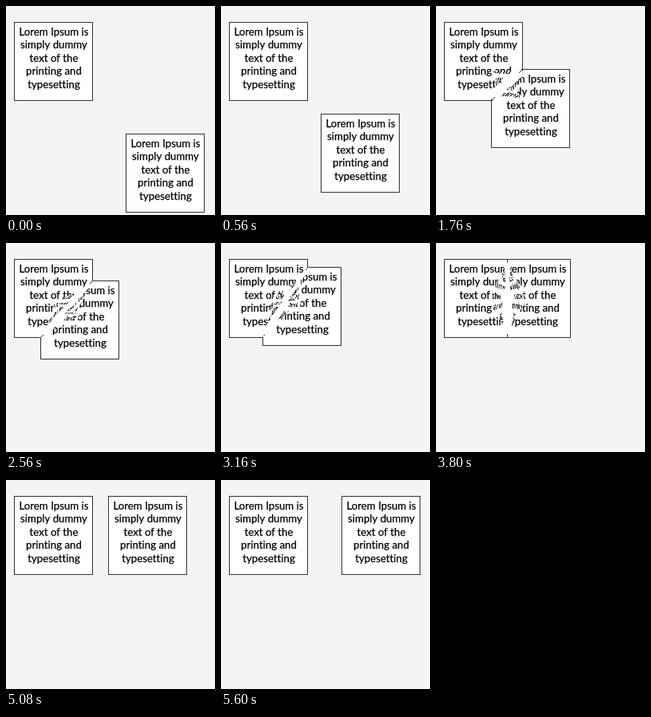
Recreate the animation shown at these times as an HTML page with a canvas. Size 262x262 px, loop 5680 ms.

```html
<!DOCTYPE html>
<html lang="en">
<head>
<meta charset="utf-8">
<title>Colliding text boxes</title>
<style>
  html, body { margin: 0; width: 100%; height: 100%; overflow: hidden; background: #f4f4f4; }
  canvas { display: block; width: 262px; height: 262px; }
</style>
</head>
<body>
<canvas id="stage" width="262" height="262"></canvas>
<script>
const STAGE = 262, SIZE = 99, HALF = SIZE / 2;
const STEP = 40, LAST_STEP = 140, LOOP = 5680;
const MARGIN = 6;
const FIXED = { x: 10, y: 20 };
const LINES = ['Lorem Ipsum is', 'simply dummy', 'text of the', 'printing and', 'typesetting'];

// Path of the moving box: [step, x, y]
const PATH = [
  [0, 150, 160], [30, 96, 106], [44, 69, 79], [60, 40.4, 50.2],
  [64, 43, 47], [75, 50, 34], [88, 57.4, 20], [140, 151, 20]
];

const ctx = document.getElementById('stage').getContext('2d');
const image = ctx.createImageData(STAGE, STAGE);
const pixels = new Uint32Array(image.data.buffer);
const card = makeCard();

function makeCard() {
  const canvas = document.createElement('canvas');
  canvas.width = canvas.height = SIZE;
  const c = canvas.getContext('2d');
  c.fillStyle = '#333';
  c.fillRect(0, 0, SIZE, SIZE);
  c.fillStyle = '#fff';
  c.fillRect(1, 1, SIZE - 2, SIZE - 2);
  c.fillStyle = c.strokeStyle = '#000';
  c.lineWidth = 0.25;
  c.font = '13.2px Lato, "Open Sans", sans-serif';
  c.letterSpacing = '0.03px'; // also turns ligatures off
  c.textAlign = 'center';
  LINES.forEach((line, i) => {
    const y = 17 + Math.round(16.4 * i);
    c.fillText(line, 50, y);
    c.strokeText(line, 50, y);
  });
  return new Uint32Array(c.getImageData(0, 0, SIZE, SIZE).data.buffer);
}

function positionAt(step) {
  const i = Math.max(1, PATH.findIndex(p => p[0] >= step));
  const [s0, x0, y0] = PATH[i - 1], [s1, x1, y1] = PATH[i];
  const k = (step - s0) / (s1 - s0);
  return { x: Math.round(x0 + (x1 - x0) * k), y: Math.round(y0 + (y1 - y0) * k) };
}

// Line nx*x + ny*y = c that divides the overlap, or null when the boxes are apart
function dividingLine(a, b) {
  const right = a.x + SIZE, bottom = a.y + SIZE;
  if (b.x >= right || b.y >= bottom) return null;
  if (b.y === a.y) return { nx: 1, ny: 0, c: (b.x + right) / 2 };
  const nx = bottom - b.y, ny = right - b.x;
  return { nx, ny, c: nx * b.x + ny * bottom };
}

// Content is squeezed along rays from the box centre so that it ends at the line
function drawBox(box, line, side) {
  const cx = box.x + HALF, cy = box.y + HALF;
  const gap = line && side * (line.c - line.nx * cx - line.ny * cy);
  for (let j = 0; j < SIZE; j++) {
    for (let i = 0; i < SIZE; i++) {
      const dx = i + 0.5 - HALF, dy = j + 0.5 - HALF;
      let scale = 1;
      if (line) {
        const reach = side * (line.nx * dx + line.ny * dy);
        if (reach > gap) continue;
        if (reach > 0) scale = squeeze(dx, dy, gap / reach);
      }
      // A strongly squeezed border is too thin to show
      const inset = scale > 1.1 ? 1 : 0;
      const u = sample(dx * scale, inset), v = sample(dy * scale, inset);
      pixels[(box.y + j) * STAGE + box.x + i] = card[v * SIZE + u];
    }
  }
}

function sample(offset, inset) {
  return Math.min(SIZE - 1 - inset, Math.max(inset, Math.floor(HALF + offset)));
}

function squeeze(dx, dy, toLine) {
  const r = Math.hypot(dx, dy);
  const edge = r * HALF / Math.max(Math.abs(dx), Math.abs(dy));
  const limit = r * toLine, lost = edge - limit;
  if (lost <= 0) return 1;
  const start = Math.max(0, limit - lost - MARGIN);
  if (r <= start) return 1;
  return 1 + lost * ((r - start) / (limit - start)) ** 2 / r;
}

function render(time) {
  const step = Math.min(LAST_STEP, Math.floor((time % LOOP) / STEP));
  const moving = positionAt(step);
  const line = dividingLine(FIXED, moving);
  pixels.fill(0xfff4f4f4);
  drawBox(FIXED, line, 1);
  drawBox(moving, line, -1);
  ctx.putImageData(image, 0, 0);
}

const begin = performance.now();
function tick() {
  render(performance.now() - begin);
  requestAnimationFrame(tick);
}
tick();
</script>
</body>
</html>
```
